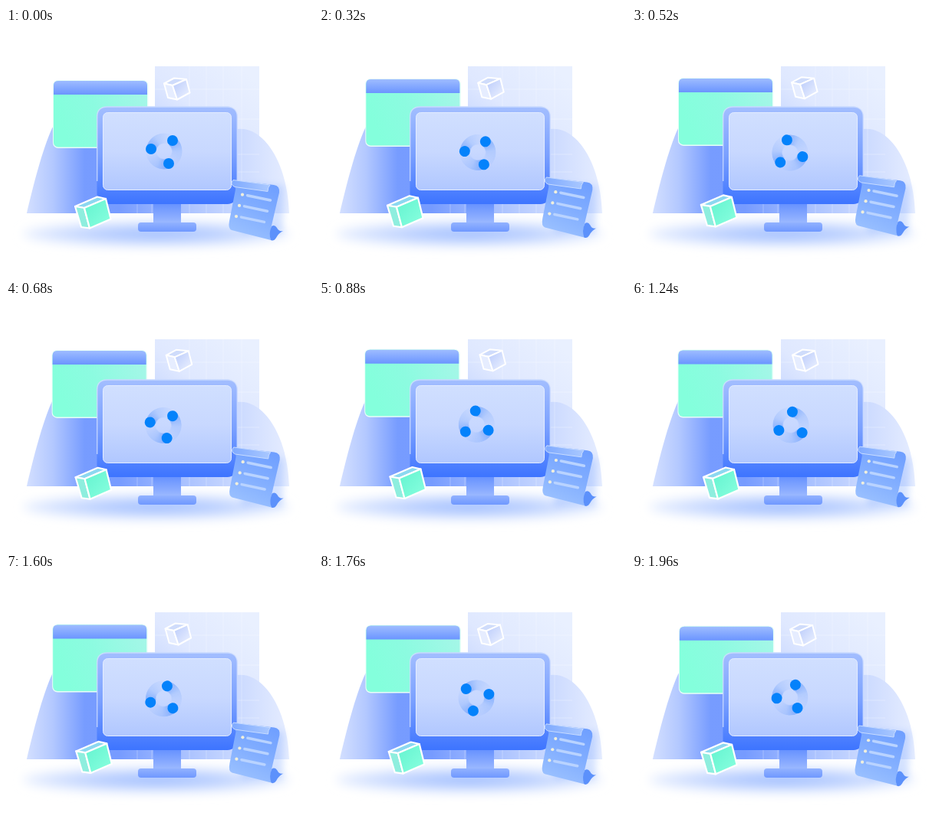
Animation, 400 px wide and 320 px high, one loop 2 s. Source, as an HTML page:

```html
<!DOCTYPE html>
<html lang="en">
<head>
<meta charset="utf-8">
<title>Loading scene</title>
<style>
  html, body { margin: 0; width: 100%; height: 100%; overflow: hidden; background: #fff; }
  svg { position: absolute; left: 0; top: 0; display: block; }
  #spinner { position: absolute; left: 176px; top: 131.8px; width: 60px; height: 60px; }
  #ring {
    position: absolute; left: 6px; top: 4.9px; width: 48px; height: 48px; border-radius: 50%;
    background: repeating-conic-gradient(from 40deg, rgba(58, 128, 250, .5) 0deg, rgba(90, 150, 250, .2) 50deg, rgba(110, 160, 250, 0) 110deg 120deg);
    -webkit-mask: radial-gradient(circle, transparent 9.5px, #000 11px 23px, transparent 24px);
    mask: radial-gradient(circle, transparent 9.5px, #000 11px 23px, transparent 24px);
  }
  .dot { position: absolute; width: 14px; height: 14px; margin: -7px; border-radius: 50%; background: #0482fb; }
</style>
</head>
<body>
<svg width="400" height="320" viewBox="0 0 400 320">
  <defs>
    <radialGradient id="floor">
      <stop offset="0" stop-color="#9dbcff"/><stop offset=".45" stop-color="#b9cfff"/>
      <stop offset="1" stop-color="#e9f0ff"/>
    </radialGradient>
    <linearGradient id="hill" gradientUnits="userSpaceOnUse" x1="27" x2="369" y1="0" y2="0">
      <stop offset="0" stop-color="#d3dfff"/><stop offset=".1" stop-color="#b3c8ff"/>
      <stop offset=".22" stop-color="#779cff"/><stop offset=".35" stop-color="#769bff"/>
      <stop offset=".6" stop-color="#a9c1ff"/><stop offset=".82" stop-color="#cddbff"/>
      <stop offset="1" stop-color="#e6edff"/>
    </linearGradient>
    <linearGradient id="panel" x1=".8" y1="0" x2=".2" y2="1">
      <stop offset="0" stop-color="#e9f0ff"/><stop offset=".4" stop-color="#dfe8ff"/>
      <stop offset="1" stop-color="#a9c1ff"/>
    </linearGradient>
    <linearGradient id="bar" x2="0" y2="1">
      <stop offset="0" stop-color="#9ebcff"/><stop offset="1" stop-color="#6b95ff"/>
    </linearGradient>
    <linearGradient id="mint" x1="0" y1=".4" x2="1" y2=".1">
      <stop offset="0" stop-color="#84ffdc"/><stop offset=".4" stop-color="#8cfbe0"/>
      <stop offset="1" stop-color="#a6f6e8"/>
    </linearGradient>
    <linearGradient id="case" x2="0" y2="1">
      <stop offset="0" stop-color="#a3beff"/><stop offset=".5" stop-color="#7aa0ff"/>
      <stop offset="1" stop-color="#3d74ff"/>
    </linearGradient>
    <linearGradient id="screen" x2="0" y2="1">
      <stop offset="0" stop-color="#d0dfff"/><stop offset=".5" stop-color="#c8d8ff"/>
      <stop offset="1" stop-color="#b0c7ff"/>
    </linearGradient>
    <linearGradient id="neck" x2="0" y2="1">
      <stop offset="0" stop-color="#638fff"/><stop offset="1" stop-color="#9cb9ff"/>
    </linearGradient>
    <linearGradient id="foot" x2="0" y2="1">
      <stop offset="0" stop-color="#92b2ff"/><stop offset="1" stop-color="#6f98ff"/>
    </linearGradient>
    <linearGradient id="glass" x1="0" y1="0" x2="1" y2="1">
      <stop offset="0" stop-color="#b9cafb"/><stop offset="1" stop-color="#eef3ff"/>
    </linearGradient>
    <linearGradient id="jade" x1="0" y1="0" x2="1" y2="1">
      <stop offset="0" stop-color="#62f3cf"/><stop offset="1" stop-color="#8affdf"/>
    </linearGradient>
    <linearGradient id="sheet" x1=".7" y1="0" x2=".3" y2="1">
      <stop offset="0" stop-color="#6f9fff"/><stop offset=".5" stop-color="#82aeff"/>
      <stop offset="1" stop-color="#9cc2ff"/>
    </linearGradient>
    <linearGradient id="roll" x1="0" x2="1" y1="0" y2="0">
      <stop offset="0" stop-color="#7faaff"/><stop offset="1" stop-color="#a9c8ff"/>
    </linearGradient>
    <filter id="soft" x="-20%" y="-60%" width="140%" height="220%"><feGaussianBlur stdDeviation="7"/></filter>
    <filter id="haze" x="-40%" y="-40%" width="180%" height="180%"><feGaussianBlur stdDeviation="5"/></filter>
  </defs>

  <ellipse cx="196" cy="269" rx="174" ry="17" fill="url(#floor)" filter="url(#soft)"/>
  <path d="M194 50H330V242H194Z" fill="url(#panel)"/>
  <path d="M27 242C36 204 47 160 60 131C72 108 92 100 118 112L160 190H270L290 134Q300 131 310 132C340 136 367 180 369 242Z" fill="url(#hill)"/>
  <path d="M307 50V230M283 50V242M261 50V242M239 50V242M190 230V242M171 230V242M194 80H330M194 119H330M302 165H330M302 188H330" stroke="#fff" stroke-opacity=".28" fill="none"/>

  <g id="window">
    <rect x="61" y="68" width="124.500" height="89" rx="7" fill="#e8fff8"/>
    <rect x="62" y="69" width="122" height="86.500" rx="6" fill="url(#mint)"/>
    <path d="M62 87V75Q62 69 68 69H178Q184 69 184 75V87Z" fill="url(#bar)"/>
  </g>

  <g id="cube" stroke="#fff" stroke-width="2" stroke-linejoin="round">
    <path d="M206 72.500L219 65.500L235 67L217 75Z" fill="#cfdcfb"/>
    <path d="M206 72.500L217 75L223 93.500L211 91Z" fill="#e6edff"/>
    <path d="M217 75L235 67L239.500 84.500L223 93.500Z" fill="url(#glass)"/>
  </g>

  <rect x="192" y="228" width="36" height="27" fill="url(#neck)"/>
  <rect x="172" y="254" width="76" height="12" rx="4" fill="url(#foot)"/>
  <rect x="118.500" y="102.500" width="183" height="127.500" rx="13" fill="url(#case)"/>
  <path d="M118.700 200V116Q118.700 103 132 103H288Q301.300 103 301.300 116V200" fill="none" stroke="#d5e2ff" stroke-opacity=".75" stroke-width="1.500"/>
  <rect x="126.500" y="110.500" width="167" height="101" rx="6" fill="url(#screen)" stroke="#e2ebff"/>

  <g id="gem" stroke="#fff" stroke-width="2.200" stroke-linejoin="round">
    <path d="M90 233L119 220.500L130 223L102 235Z" fill="#8cd8f0"/>
    <path d="M90 233L102 235L109 261.500L98 260Z" fill="#8eeede"/>
    <path d="M102 235L130 223L136.500 249.500L109 261.500Z" fill="url(#jade)"/>
  </g>

  <path d="M312 204L362 206L360 268L306 268Z" fill="#79a5ff" opacity=".32" filter="url(#haze)"/>
  <g id="paper">
    <path d="M298 199L349 205Q357 206 356 215L346 258Q343 268 345 277L294 264Q289 262 291 252L299 211Z" fill="url(#sheet)"/>
    <path d="M345 277Q342 268 346 259Q350 256 353 261Q355 266 361 265Q355 268 352 274Q349 279 345 277Z" fill="#5c91fb"/>
    <path d="M296 198.500L344 205Q341 208 341 213.500L298 207.500Q291 204 296 198.500Z" fill="url(#roll)" stroke="#c8dcff" stroke-width="1"/>
    <g id="rows" stroke="#b9d3ff" stroke-width="3.500" stroke-linecap="round"></g>
  </g>
</svg>
<div id="spinner"><div id="ring"></div></div>

<script>
const LOOP = 2000, STEP = 40;
const $ = id => document.getElementById(id);
const spinner = $('spinner');

for (const deg of [-50, 70, 190]) {
  const a = deg * Math.PI / 180, dot = document.createElement('div');
  dot.className = 'dot';
  dot.style.left = 30 + 17.4 * Math.cos(a) + 'px';
  dot.style.top = 28.9 + 17.4 * Math.sin(a) + 'px';
  spinner.append(dot);
}

$('rows').innerHTML = [0, 1, 2].map(i => {
  const x = 308 - 4 * i, y = 217.7 + 14.2 * i;
  return `<circle cx="${x}" cy="${y}" r="2.1" fill="#f0efdc" stroke="none"/>` +
    `<path d="M${x + 6.500} ${y + 1}l30 6.300"/>`;
}).join('');

// Sideways drift of the green cube: [ms, px]
const sway = [[0, 0], [320, -1], [680, .6], [880, 2.5], [1040, 3.3], [1240, 3], [1600, 1.3], [2000, 0]];

function lerpTable(table, t) {
  const i = table.findIndex(([ms]) => ms > t);
  const [t0, v0] = table[i - 1], [t1, v1] = table[i];
  return v0 + (v1 - v0) * (t - t0) / (t1 - t0);
}

function move(id, x, y) {
  $(id).setAttribute('transform', `translate(${x} ${y})`);
}

function draw(now) {
  const t = Math.floor(now % LOOP / STEP) * STEP;
  const lift = 1 - Math.abs(t / 1000 - 1);
  move('window', -2 * lift, -6 * lift);
  move('cube', 4 * lift, -2.5 * lift);
  move('gem', lerpTable(sway, t), -4 * lift);
  move('paper', lift, -11 * lift);
  spinner.style.transform = `rotate(${t * .36}deg)`;
}

const start = performance.now();
function tick() {
  draw(performance.now() - start);
  requestAnimationFrame(tick);
}
tick();
</script>
</body>
</html>
```
